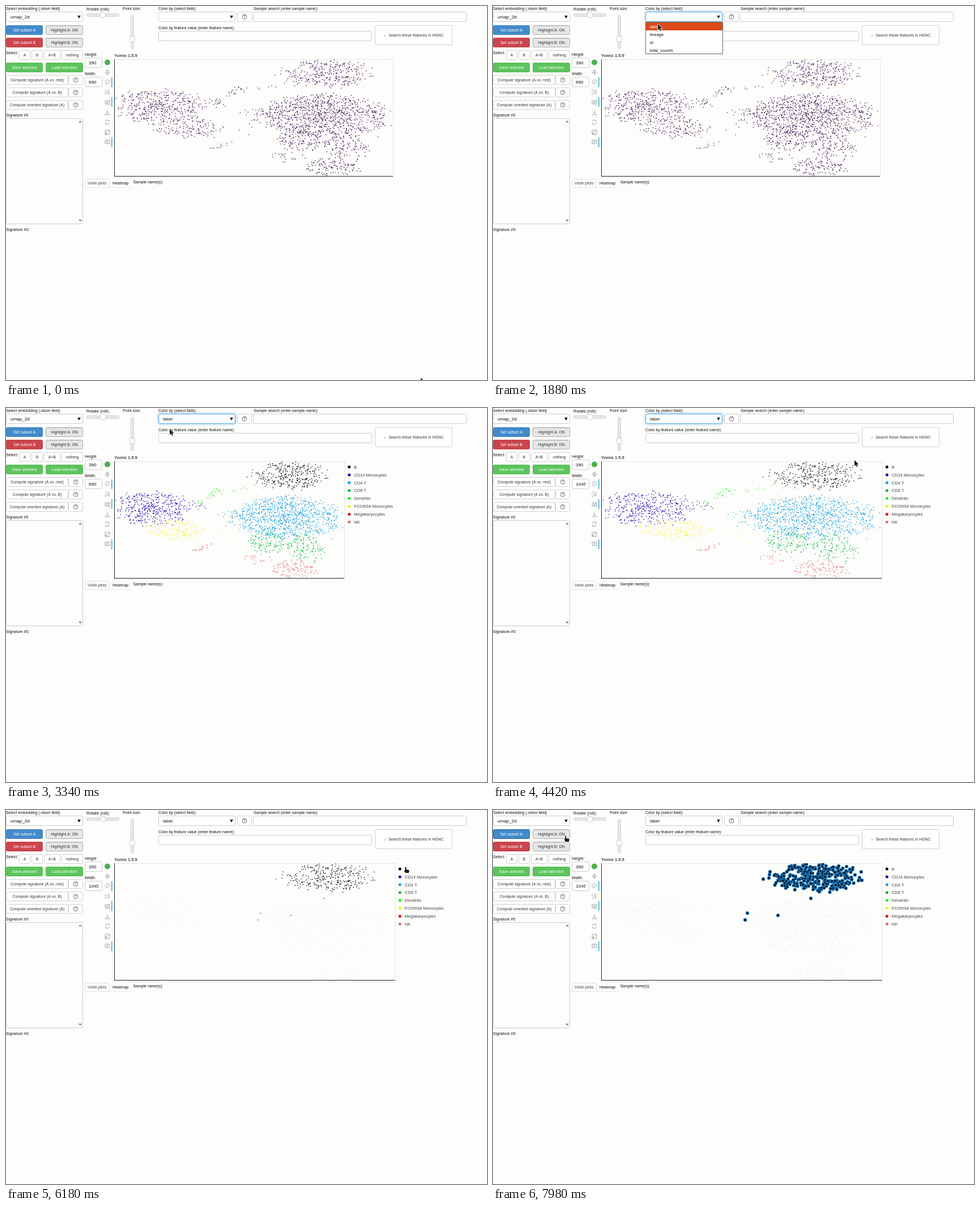
An HTML page with a canvas for the animation above (8000 ms loop, 849 by 660 pixels).

```html
<!DOCTYPE html>
<html lang="en">
<head>
<meta charset="utf-8">
<title>Embedding viewer</title>
<style>
html, body { margin: 0; width: 100%; height: 100%; overflow: hidden; background: #fdfdfb; }
canvas { display: block; width: 849px; height: 660px; }
</style>
</head>
<body>
<canvas id="stage" width="849" height="660"></canvas>
<script>
const ctx = document.getElementById('stage').getContext('2d');
const LOOP = 8000;
const BACKGROUND = '#fdfdfb';
const SMALL = 6.93, MEDIUM = 7.5, LARGE = 8.08;
const PLOT = { left: 191, top: 94, bottom: 300, fullWidth: 495.5 };

// When each interaction takes effect, in ms
const AT = { open: 1050, choose: 2390, recolor: 2960, widen: 3470, blur: 5380, isolate: 5560, highlight: 7350 };

const GROUPS = [
  ['B', '#000000'], ['CD14 Monocytes', '#1400b4'], ['CD4 T', '#0c9be0'], ['CD8 T', '#08b43c'],
  ['Dendritic', '#12f812'], ['FCGR3A Monocytes', '#fbf00c'], ['Megakaryocytes', '#dc0812'], ['NK', '#e06c78']
];

// ---- Scatter data ----
let seed = 20731;
function random() {
  seed = (seed + 0x6D2B79F5) | 0;
  let v = Math.imul(seed ^ (seed >>> 15), 1 | seed);
  v = (v + Math.imul(v ^ (v >>> 7), 61 | v)) ^ v;
  return ((v ^ (v >>> 14)) >>> 0) / 4294967296;
}

const points = [];
function spot(group, ...xy) {
  for (let i = 0; i < xy.length; i += 2) points.push({ group, x: xy[i], y: xy[i + 1] });
}
// Elliptic cloud, densest in the middle with a ragged rim
function blob(group, count, cx, cy, rx, ry, tilt = 0) {
  for (let i = 0; i < count; i++) {
    const angle = random() * Math.PI * 2;
    const r = Math.pow(random(), 0.57) * (0.84 + random() * 0.3);
    const dx = Math.cos(angle) * r * rx;
    spot(group, cx + dx, cy + Math.sin(angle) * r * ry + dx * tilt);
  }
}

blob(2, 960, 564, 194, 114, 37);
blob(2, 30, 462, 192, 42, 17);
spot(2, 415, 188, 424, 184, 426, 192, 431, 208, 683, 211, 660, 231);
blob(1, 410, 272, 177, 85, 30);
blob(1, 14, 352, 172, 30, 10);
spot(1, 385, 174, 388, 177, 380, 168, 376, 172);
blob(5, 140, 323, 215, 60, 18, 0.03);
spot(5, 413, 219, 430, 227, 436, 214, 369, 232);
blob(3, 130, 524, 237, 44, 21, 0.12);
blob(3, 130, 604, 248, 40, 25, 0.05);
blob(7, 120, 575, 284, 54, 17);
blob(7, 20, 502, 267, 32, 9);
blob(0, 310, 571, 119, 74, 25);
spot(0, 477, 122, 487, 120, 488, 114, 489, 109, 561, 156, 449, 182, 445, 194, 503, 186, 651, 124);
blob(4, 8, 375, 168, 12, 5);
blob(4, 10, 400, 155, 12, 9, -0.4);
blob(4, 10, 416, 147, 20, 5);
spot(4, 447, 145, 450, 147, 465, 143, 471, 141, 478, 143, 494, 136, 512, 141);
spot(6, 361, 251, 365, 251, 368, 251, 374, 250, 377, 250, 380, 249, 382, 247, 381, 244, 391, 246, 391, 242, 400, 240);

// ---- Drawing helpers ----
function text(s, x, y, size = SMALL, color = '#111', align = 'left', weight = '') {
  ctx.font = `${weight} ${size}px "Liberation Sans", Arial, sans-serif`;
  ctx.textAlign = align;
  ctx.textBaseline = 'alphabetic';
  ctx.fillStyle = color;
  ctx.fillText(s, x, y + size * 0.36);
}
function box(x, y, w, h, fill = '#fff', border = '#d0d0d0', radius = 2) {
  ctx.beginPath();
  ctx.roundRect(x + 0.5, y + 0.5, w - 1, h - 1, radius);
  ctx.fillStyle = fill;
  ctx.fill();
  ctx.strokeStyle = border;
  ctx.lineWidth = 1;
  ctx.stroke();
}
function poly(coords, fill) {
  ctx.beginPath();
  for (let i = 0; i < coords.length; i += 2) ctx.lineTo(coords[i], coords[i + 1]);
  ctx.closePath();
  ctx.fillStyle = fill;
  ctx.fill();
}
function dot(x, y, r, fill) {
  ctx.beginPath();
  ctx.arc(x, y, r, 0, Math.PI * 2);
  ctx.fillStyle = fill;
  ctx.fill();
}
function line(x1, y1, x2, y2, color) {
  ctx.beginPath();
  ctx.moveTo(x1, y1);
  ctx.lineTo(x2, y2);
  ctx.strokeStyle = color;
  ctx.lineWidth = 1;
  ctx.stroke();
}
function button(label, x, y, w, h = 17, fill = '#fff', border = '#d0d0d0', color = '#333') {
  box(x, y, w, h, fill, border);
  text(label, x + w / 2, y + h / 2, SMALL, color, 'center');
}
function pressed(label, y) {
  button(label, 70, y, 66, 17, '#e6e6e6', '#adadad');
  line(72, y + 1.5, 134, y + 1.5, '#d2d2d2');
}
function helpButton(x, y, w, h) {
  box(x, y, w, h);
  ctx.beginPath();
  ctx.arc(x + w / 2, y + h / 2, 4, 0, Math.PI * 2);
  ctx.strokeStyle = '#555';
  ctx.lineWidth = 0.8;
  ctx.stroke();
  text('?', x + w / 2, y + h / 2, 6.5, '#333', 'center');
}
function dropdown(value, x, focused) {
  ctx.save();
  if (focused) {
    ctx.shadowColor = 'rgba(102,175,233,.7)';
    ctx.shadowBlur = 4;
  }
  box(x, 10, 136, 18, '#fff', focused ? '#5fb2e4' : '#ccc');
  ctx.restore();
  text(value, x + 8, 19.3, LARGE);
  poly([x + 126.3, 17, x + 131.7, 17, x + 129, 22], '#000');
}
function field(value, y) {
  box(139, y, 31, 18, '#fff', '#ccc');
  ctx.save();
  ctx.beginPath();
  ctx.rect(145, y, 18.5, 18);
  ctx.clip();
  text(value, 146, y + 9, LARGE);
  ctx.restore();
}

// ---- Interface ----
function controls(t) {
  const hoverA = t >= 6960 && t < 7930, clickedA = t >= AT.highlight;
  text('Select embedding (.obsm field)', 0, 5);
  dropdown('umap_2d', 0, false);
  button('Set subset A', 0, 34, 65, 17, hoverA ? '#3277b4' : '#428bca', hoverA || clickedA ? '#285e8e' : '#3a80bd', '#fff');
  pressed('Highlight A: ON', 34);
  button('Set subset B', 0, 56, 65, 17, '#cc444c', '#c03c44', '#fff');
  pressed('Highlight B: ON', 56);
  text('Select:', 0, 83);
  button('A', 23, 78, 20);
  button('B', 45, 78, 20);
  button('A+B', 67, 78, 29);
  button('nothing', 98, 78, 38);
  button('Save selected', 0, 100, 65, 17, '#5cc45c', '#54b954', '#fff');
  button('Load selection', 70, 100, 66, 17, '#5cc45c', '#54b954', '#fff');
  ['Compute signature (A vs. rest)', 'Compute signature (A vs. B)', 'Compute oriented signature (A)'].forEach((label, i) => {
    button(label, 0, 122 + i * 22, 110);
    helpButton(110, 122 + i * 22, 26, 17);
  });
  text('Signature #0', 0, 193);
  box(0, 198, 136, 187, BACKGROUND, '#ccc');
  poly([128, 205.5, 134, 205.5, 131, 202], '#888');
  poly([128, 377, 134, 377, 131, 380.5], '#888');
  text('Signature #0:', 0, 395);

  text('Rotate (roll):', 142, 5, MEDIUM);
  box(142, 13, 58, 6, '#e6e6e6', '#d5d5d5');
  box(166, 11, 10, 10, '#fff', '#ccc');
  text('Point size:', 206, 5);
  box(220, 16, 6, 60, '#e6e6e6', '#d5d5d5');
  box(218, 53, 10, 10, '#fff', '#ccc');

  text('Height:', 139, 86);
  field('390', 91);
  text('Width:', 139, 119.5);
  field(t < AT.widen ? '890' : '1045', 125);

  text('Color by (select field):', 269, 5);
  dropdown(t < AT.choose ? '' : 'label', 269, t >= AT.open && t < AT.blur);
  helpButton(408, 10, 26, 18);
  text('Sample search (enter sample name):', 437, 5);
  box(436, 10, 377, 18, '#fff', '#ccc');
  text('Color by feature value (enter feature name):', 269, 39);
  box(269, 44, 377, 18, '#fff', '#ccc');
  button('← Search these features in HGNC', 651, 34, 137, 35);

  line(139, 320.5, 223, 320.5, '#e8e8e8');
  box(139, 305, 44, 16, BACKGROUND, '#e0e0e0');
  text('Violin plots', 144, 312.5, SMALL, '#444');
  text('Heatmap', 188, 312.5);
  text('Sample name(s):', 224.5, 311);
}

const ICONS = [
  [117, 'M-4 0H4M0-4V4M-2.5-2.5L0-4L2.5-2.5M-2.5 2.5L0 4L2.5 2.5M-3-1.3L-4 0L-3 1.3M3-1.3L4 0L3 1.3'],
  [134, 'M-2 2C-6 0-3-4 1-3.5C6-3 4 3-1 2C-3 2-3 4-1.5 4'],
  [152, 'M-4-4H-2M0-4H2M4-4V-2M-4-2V0M-4 2V4H-2M4 4L2 2M3 .5A2.2 2.2 0 1 1-1.4 .5A2.2 2.2 0 1 1 3 .5'],
  [170, 'M-4-3H-1V3H-4ZM3.5 0A2 2 0 1 0-.5 0A2 2 0 1 0 3.5 0M1-3.5H4V-1M0 4H4V2'],
  [188, 'M0-4V2M-2-.5L0 2L2-.5M-4 2V4H4V2'],
  [205, 'M-3.5-.5A3.5 3.5 0 0 1 3-2.3M3-4V-2H1M3.5 .5A3.5 3.5 0 0 1-3 2.3M-3 4V2H-1'],
  [223, 'M-4-4H4V4H-4ZM-3 3L3-3M-3 0V3H0'],
  [240, 'M-4-3.5H4V2.5H1L0 4L-1 2.5H-4ZM-2-1.5H2M-2 .5H1']
].map(([y, d]) => [y, new Path2D(d)]);

function toolbar() {
  dot(179, 99.5, 5, '#4caf50');
  for (const [y, path] of ICONS) {
    ctx.save();
    ctx.translate(179, y);
    ctx.strokeStyle = '#999ea1';
    ctx.lineWidth = 0.9;
    ctx.stroke(path);
    ctx.restore();
  }
  ctx.fillStyle = '#2fb0dc';
  for (const y of [126, 161, 232]) ctx.fillRect(186, y, 1.5, 17);
}

function plot(t) {
  const colored = t >= AT.recolor, isolated = t >= AT.isolate, highlighted = t >= AT.highlight;
  const right = !colored ? 683 : t < AT.widen ? 597 : 686.5;
  const width = right - PLOT.left, scale = width / PLOT.fullWidth;
  text('Yomix 1.5.9', 191, 87, MEDIUM, '#444', 'left', 'bold');
  ctx.strokeStyle = '#e4e4e8';
  ctx.lineWidth = 1;
  ctx.strokeRect(191.5, 94.5, width, 206);

  ctx.save();
  ctx.beginPath();
  ctx.rect(PLOT.left, PLOT.top, width + 1, PLOT.bottom - PLOT.top);
  ctx.clip();
  for (const p of points) {
    const x = PLOT.left + (p.x - PLOT.left) * scale;
    if (isolated && p.group !== 0) {
      ctx.fillStyle = highlighted ? 'rgba(70,70,100,.1)' : 'rgba(70,70,100,.06)';
      ctx.fillRect(x - 0.5, p.y - 0.5, 1, 1);
    } else if (highlighted) {
      dot(x, p.y, 2.6, '#061420');
      ctx.strokeStyle = '#1d7fc8';
      ctx.lineWidth = 1.1;
      ctx.stroke();
    } else {
      dot(x, p.y, 0.82, colored ? GROUPS[p.group][1] : '#3a0a4e');
    }
  }
  ctx.restore();
  line(191.5, 94, 191.5, 301, '#222');
  line(191, 300.5, right, 300.5, '#222');

  if (colored) GROUPS.forEach(([name, color], i) => {
    const y = 104 + i * 13.9;
    dot(right + 8.8, y, 2.5, color);
    text(name, right + 17.3, y, MEDIUM, '#444');
  });
}

function menu(t, pointer) {
  if (t < AT.open || t >= AT.choose) return;
  box(269, 28, 137, 57, '#fff', '#666', 0);
  const hovered = pointer.y > 29;
  if (hovered) {
    ctx.fillStyle = '#dc4a1a';
    ctx.fillRect(270, 29, 135, 14);
  }
  ['label', 'lineage', 'id', 'total_counts'].forEach((item, i) =>
    text(item, 277, 36.2 + i * 13.9, MEDIUM, hovered && i === 0 ? '#fff' : '#111'));
}

// ---- Pointer: [time, x, y] ----
const PATH = [
  [30, 732, 656], [690, 308, 19], [1560, 308, 20], [1880, 291, 32], [2040, 289, 37], [3800, 289, 37],
  [4420, 638, 92], [4580, 668, 96], [5190, 705, 101], [6180, 705, 101], [6980, 42, 45], [7160, 37, 42],
  [7900, 37, 42], [7980, 128, 46]
];
function pointerAt(t) {
  const next = PATH.findIndex(k => k[0] > t);
  if (next === 0) return { x: PATH[0][1], y: PATH[0][2] };
  if (next < 0) return { x: 128, y: 46 };
  const [t0, x0, y0] = PATH[next - 1], [t1, x1, y1] = PATH[next];
  const p = (t - t0) / (t1 - t0);
  const e = p * p * (3 - 2 * p);
  return { x: x0 + (x1 - x0) * e, y: y0 + (y1 - y0) * e };
}
const ARROW = new Path2D('M0 0V10.5L2.4 8.3L4.2 12L5.9 11.2L4.2 7.6H7.6Z');
const HAND = new Path2D('M-.8 0Q.5-1 1.3 .2V4L6 4.8Q7 5.2 6.6 7L6 10H.3L-2.6 6.3Q-2.6 5-.8 6Z');
function drawPointer({ x, y }) {
  const onLegend = x > 690 && y > 98 && y < 208;
  const onButtons = x < 136 && y > 33 && y < 184;
  const shape = onLegend || onButtons ? HAND : ARROW;
  ctx.save();
  ctx.translate(x, y);
  ctx.lineJoin = 'round';
  ctx.strokeStyle = 'rgba(255,255,255,.9)';
  ctx.lineWidth = 1.6;
  ctx.stroke(shape);
  ctx.fillStyle = '#1c1c1c';
  ctx.fill(shape);
  ctx.restore();
}

function render(t) {
  ctx.fillStyle = BACKGROUND;
  ctx.fillRect(0, 0, 849, 660);
  const pointer = pointerAt(t);
  controls(t);
  toolbar();
  plot(t);
  menu(t, pointer);
  drawPointer(pointer);
}

const start = performance.now();
function tick() {
  render((performance.now() - start) % LOOP);
  requestAnimationFrame(tick);
}
tick();
</script>
</body>
</html>
```
